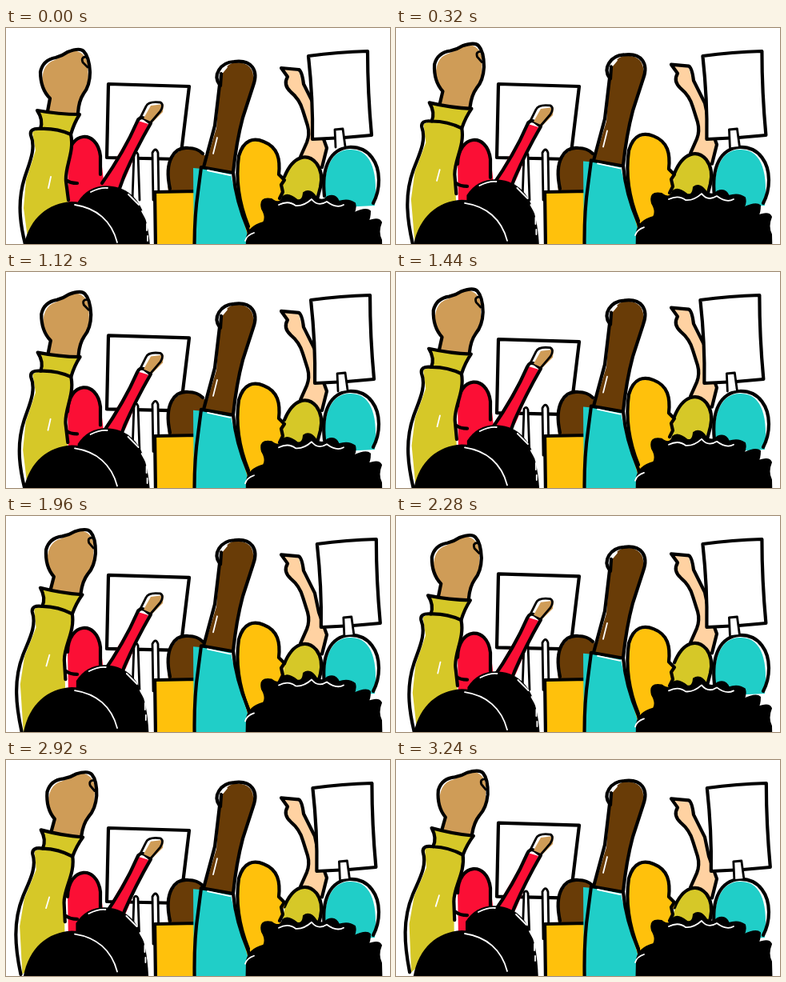
Animation, 480 px wide and 270 px high, one loop 3.28 s. Source, as an HTML page:

```html
<!DOCTYPE html>
<html>
<head>
<meta charset="utf-8">
<style>
html, body { margin: 0; width: 100%; height: 100%; overflow: hidden; background: #fff; }
svg { display: block; width: 100vw; height: 100vh; }
g { fill: none; stroke-linecap: round; stroke-linejoin: round; }
.ink { stroke: #000; stroke-width: 4.2; }
.thin { stroke-width: 2.8; }
.gap { stroke: #fff; stroke-width: 1.8; }
.red { fill: #fb0f35; } .gold { fill: #ffc10c; } .teal { fill: #20cec8; } .olive { fill: #d6c828; }
.tan { fill: #cf9c57; } .pale { fill: #ffd2a2; } .brown { fill: #693c07; } .white { fill: #fff; } .black { fill: #000; }
</style>
</head>
<body>
<svg viewBox="0 0 480 270">
  <g id="board">
    <path class="ink white" d="M128 70L229 73L218 164L126 162Z"/>
    <path class="ink thin white" d="M158 215L160 157Q163 153 165 158L167 215M184 215L183 156Q187 148 190 156L191 215"/>
  </g>
  <g id="redMan">
    <path class="red" d="M78 225L77 163C80 128 116 126 119 165L122 190L165 116L178 120L150 186L128 225Z"/>
    <path class="ink" d="M77 166C78 128 114 126 118 160L118 183M120 194Q148 154 164 117Q167 110 173 113L181 119Q162 152 148 184L140 206M75 190Q80 194 89 194"/>
    <path class="tan" d="M172 113L181 97L197 95L196 105L183 118Z"/>
    <path class="ink thin" d="M168 112L175 98Q178 91 193 93Q198 96 193 104L181 118"/>
  </g>
  <g>
    <path class="brown" d="M203 205C198 165 213 147 235 151L250 160V205Z"/>
    <path class="ink" d="M205 201C197 165 211 148 228 150Q239 150 246 157"/>
    <path class="ink gold" d="M187 275L186 205L240 204V275Z"/>
  </g>
  <g id="paleMan">
    <path class="pale" d="M345 51L366 54L372 75L387 102L392 124L400 146L394 178L368 166L378 135L374 108L364 88L349 73L352 62Z"/>
    <path class="ink" d="M395 174L401 150L391 122L386 98L372 70Q370 54 366 52L344 50L352 61Q346 71 356 80Q367 89 371 103L377 122Q380 133 376 143L368 161"/>
    <path class="olive" d="M342 225L349 184Q362 157 383 165Q402 183 388 222Z"/>
    <path class="ink" d="M348 186C359 159 377 156 388 169Q397 181 393 199L388 218"/>
  </g>
  <g id="sign">
    <path class="ink white" d="M378 35Q415 30 452 29Q452 80 457 134Q420 138 383 139Q384 90 378 35Z"/>
  </g>
  <g>
    <path class="teal" d="M400 225C394 180 405 152 430 152C459 151 465 185 461 222Z"/>
    <path class="ink" d="M398 210C394 173 406 151 429 149C455 148 466 170 466 190Q466 206 459 219"/>
  </g>
  <g id="stick"><path class="ink thin white" d="M412 149L411 127L421 126L424 148"/></g>
  <g id="goldMan">
    <path class="gold" d="M304 275C291 230 285 190 292 160C299 134 335 133 341 164L342 184L349 192L344 204L342 240L318 275Z"/>
    <path class="ink" d="M303 248C290 216 287 188 291 160C297 139 310 137 322 142C340 149 343 164 341 183L348 190L344 196L346 205L342 213"/>
  </g>
  <g id="raised">
    <path class="teal" d="M235 300L234 175L280 179L289 217L315 300Z"/>
    <path class="brown" d="M248 175L263 125L267 75Q269 45 287 43Q312 43 309 68L291 132L284 181Z"/>
    <path class="ink" d="M247 174L261 122L267 71C258 59 268 43 285 42C307 39 316 53 309 72L296 112Q288 142 284 180"/>
    <path class="ink" d="M268 72L269 57M236 300Q234 245 240 205L244 174L284 181Q287 215 303 253L314 300"/>
    <path class="gap" d="M259 157L264 137M271 55L276 49M252 178L280 184"/>
  </g>
  <g id="curls">
    <path class="black" stroke="#000" stroke-width="2" d="M300 305L301 263Q303 248 322 243Q326 236 320 226Q316 211 332 214Q343 222 346 211Q352 205 364 215Q371 217 372 206Q380 200 388 212Q396 218 402 211Q412 207 416 217Q428 213 436 219Q438 226 434 232Q450 224 455 229Q455 238 452 242Q466 236 469 243Q464 255 469 265L470 305Z"/>
    <path class="gap" d="M341 221Q353 215 362 222Q372 223 382 214Q390 224 401 217Q413 226 422 221M299 266Q301 259 310 256"/>
  </g>
  <g id="leftArm">
    <path class="olive" d="M33 130L44 125L81 133L83 148L75 190L79 232L30 285L22 225L25 190L37 153Z"/>
    <path class="tan" d="M51 108L56 91L46 75Q42 46 61 40L83 28Q99 29 102 45L103 68L92 94L90 110Z"/>
    <path class="ink" d="M52 104L55 88C45 78 43 64 43 55Q46 40 62 37Q70 35 77 30Q92 24 97 29Q104 36 105 55Q105 72 97 82Q91 91 90 106"/>
    <path class="ink thin" d="M101 36Q93 36 96 43L102 49"/>
    <path class="olive ink" d="M39 103Q66 108 92 108Q85 119 81 133Q63 125 43 126Q47 115 39 103Z"/>
    <path class="ink" d="M43 126Q29 125 31 134C38 151 29 169 23 188C13 220 18 251 28 285M81 133C86 155 73 174 75 192L78 215"/>
    <path class="gap" d="M53 200L56 186"/>
  </g>
  <g id="backHead">
    <path class="black" d="M90 217C101 199 121 193 142 200C167 209 181 235 181 300H90Z"/>
    <path class="gap" d="M106 205Q118 199 127 200M153 208L166 221M170 229L175 238M176 245V253M177 260V266"/>
  </g>
  <g id="frontHead">
    <path class="black" d="M20 290C22 245 47 219 82 217C116 217 136 245 143 290Z"/>
    <path class="gap" d="M86 221C113 225 132 241 139 268"/>
  </g>
</svg>
<script>
const LOOP = 3280, STEP = 40;

// Straight back-and-forth from 0 to 1 and back, each way lasting `half` ms
function swing(t, half) {
  const x = Math.max(t, 0) / half % 2;
  return 1 - Math.abs(1 - x);
}

function place(id, transform) {
  document.getElementById(id).setAttribute('transform', transform);
}
const move = (id, x, y) => place(id, `translate(${x} ${y})`);

function draw(now) {
  const t = Math.floor(now % LOOP / STEP) * STEP;
  // The front row and gold head stop at the top of their third rise
  const up = swing(Math.min(t, 3000), 600);
  const signX = 11 * swing(t, 650);

  move('board', 0, 15 * swing(t - 640, 760));
  move('redMan', 0, 6 - 6 * Math.cos(4 * Math.PI * t / LOOP));
  move('paleMan', 0, -7 * swing(t, 520));
  move('sign', signX, 0);
  move('stick', signX, 0);
  move('goldMan', 0, -12 * swing(Math.min(t, 2800), 560));
  move('raised', 0, -16 * up);
  move('curls', 0, -13 * up);
  move('backHead', -3 * up, -15 * up);
  move('frontHead', 0, -4 * up);
  place('leftArm', `rotate(${5.2 * up} 240 155)`);
  requestAnimationFrame(draw);
}
requestAnimationFrame(draw);
</script>
</body>
</html>
```
